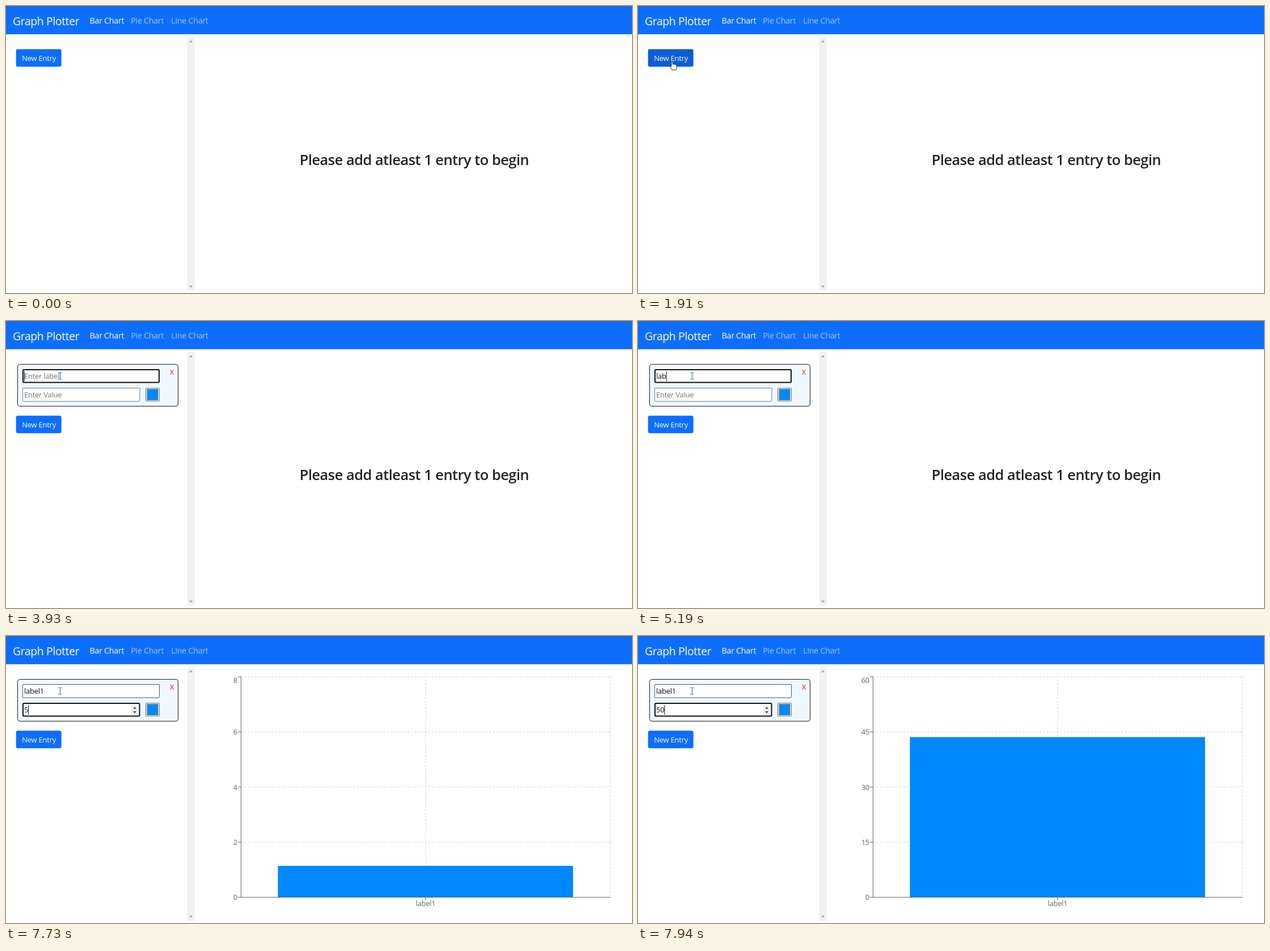
An HTML page for the animation above (8 s loop, 1104 by 507 pixels).

```html
<!DOCTYPE html>
<html lang="en">
<head>
<meta charset="utf-8">
<title>Graph Plotter</title>
<style>
  html, body { margin: 0; width: 100%; height: 100%; overflow: hidden; background: #fff; }
  svg { display: block; width: 1104px; height: 507px; }
  text { font: 13px "Open Sans", "Noto Sans", sans-serif; letter-spacing: -.02em; white-space: pre; }
  .brand { font-size: 19.45px; fill: #fff; }
  .nav text { font-size: 14.3px; fill: #fff; }
  .nav .dim { fill: #9ec5fe; }
  #heading { font-size: 25.45px; font-weight: 600; fill: #212529; text-anchor: middle; }
  .field { fill: #fff; stroke: #767676; }
  .field.focus { stroke: #101010; stroke-width: 2; }
  .grid { stroke: #ccc; stroke-dasharray: 3 3; fill: none; }
  .axis { stroke: #666; fill: none; }
  #chart text { fill: #666; }
  .caret { fill: #111; }
  .hidden { display: none; }
</style>
</head>
<body>
<svg viewBox="0 0 1104 507">
  <rect width="1104" height="49" fill="#0d6efd"/>
  <rect y="49" width="1104" height="1" fill="#3f7fe0"/>
  <rect width="1104" height="1" fill="#456a9e"/>
  <text class="brand" x="12" y="33.5">Graph Plotter</text>
  <g class="nav">
    <text x="147.5" y="31">Bar Chart</text>
    <text class="dim" x="220.3" y="31">Pie Chart</text>
    <text class="dim" x="291.3" y="31">Line Chart</text>
  </g>

  <rect x="319.5" y="55" width="13.5" height="448" fill="#f1f1f1"/>
  <path d="M323 64l3.2-3.4 3.2 3.4zM323 494l3.2 3.4 3.2-3.4z" fill="#9ba1b5"/>

  <text id="heading" x="720" y="281">Please add atleast 1 entry to begin</text>

  <g id="chart">
    <path class="grid" d="M414.5 72.5H1066M414.5 169.5H1066M414.5 266.5H1066M414.5 364.5H1066M414.5 461.5H1066M740 72V461M1066 72V461M414.5 72V461"/>
    <rect id="bar" x="479.5" width="520.5" fill="#08f"/>
    <path class="axis" d="M414.5 72V461.5H1066M740 461.5v5.5"/>
    <g id="ticks"></g>
    <text x="740" y="477" text-anchor="middle">label1</text>
  </g>

  <g id="card">
    <rect x="20.5" y="76.5" width="283" height="74" rx="4" fill="#f0f8ff" stroke="#16191c"/>
    <text id="remove" x="288.7" y="94.5">X</text>
    <rect id="labelBox" rx="1.5"/>
    <text id="labelText" x="32" y="102.3"></text>
    <rect id="labelCaret" class="caret" y="89" width="1" height="17.5"/>
    <rect id="valueBox" rx="1.5"/>
    <text id="valueText" x="32" y="135.2"></text>
    <rect id="valueCaret" class="caret" y="122" width="1" height="17"/>
    <g id="spinner">
      <rect x="221" y="121.5" width="12" height="17" fill="#efefef"/>
      <path d="M224 128.5l3-3.5 3 3.5zM224 133l3 3.5 3-3.5z" fill="#444"/>
    </g>
    <rect x="246.5" y="118.5" width="24" height="23" rx="1.5" fill="#efefef" stroke="#767676"/>
    <rect x="249" y="120.5" width="19" height="19" fill="#08f" stroke="#777"/>
  </g>

  <g id="button">
    <rect id="ring" x="15" y="74" width="85.5" height="36" rx="6" fill="#98c1fe"/>
    <rect id="face" x="17.7" y="76.2" width="80" height="31" rx="3.2"/>
    <text x="28.3" y="96.8" fill="#fff">New Entry</text>
  </g>

  <g id="arrow">
    <path d="M.5.5V13.2L3.4 10.5 5.4 15 7.3 14.2 5.4 9.8H9.3Z" fill="#fff" stroke="#111" stroke-width=".9"/>
  </g>
  <g id="hand">
    <path d="M-1.2 1Q0-.8 1.2 1V6Q2.6 5 3.8 6.3 5.2 5.4 6.3 6.8 7.8 6.2 8.4 8V11.5Q8 14 6.8 16H.2Q-1.5 13-4 9.8-3.6 8-1.2 10Z" fill="#fff" stroke="#111" stroke-width=".9"/>
  </g>
  <path id="ibeam" d="M-3-6H-1Q0-6 .5-5.5 1-6 2-6H3.5M.5-5.5V5.5M-3 6H-1Q0 6 .5 5.5 1 6 2 6H3.5" fill="none"/>
</svg>
<script>
const LOOP = 8000;
const el = {};
document.querySelectorAll('[id]').forEach(node => el[node.id] = node);

const clamp = v => Math.max(0, Math.min(1, v));
const show = (node, on) => node.classList.toggle('hidden', !on);
const attrs = (node, values) => {
  for (const name in values) node.setAttribute(name, values[name]);
};
// Latest entry of a [time, value] list
const at = (list, t) => list.reduce((found, [time, value]) => t >= time ? value : found, list[0][1]);

const svgNode = (name, parent) =>
  parent.appendChild(document.createElementNS('http://www.w3.org/2000/svg', name));
const tickLabels = [0, 1, 2, 3, 4].map(i => {
  const y = 461.5 - i * 97.35;
  attrs(svgNode('path', el.ticks), { class: 'axis', d: `M409 ${y}h5.5` });
  const label = svgNode('text', el.ticks);
  attrs(label, { x: 408, y: i === 4 ? 83 : y + 4.7, 'text-anchor': 'end' });
  return label;
});

const moves = [
  { start: 70, end: 340, steps: 4, from: [1093.7, 549.3], to: [519, 340] },
  { start: 740, end: 950, steps: 4, from: [519, 340], to: [57, 160] },
  { start: 1220, end: 1830, steps: 9, from: [56.5, 160], to: [60, 97] },
  { start: 2440, end: 2590, steps: 3, from: [60, 97], to: [95, 97] }
];
const labelTyping = [[0, ''], [4990, 'l'], [5120, 'la'], [5190, 'lab'], [5520, 'labe'], [5720, 'label'], [6250, 'label1']];
const valueTyping = [[0, ''], [7660, '5'], [7870, '50']];
const labelBlink = [[0, false], [2860, true], [3400, false], [3930, true], [4460, false], [4990, true], [6780, false]];
const valueBlink = [[0, false], [6850, true], [7380, false], [7660, true]];
const ringFade = [[0, 0], [2050, .6], [2110, 1], [2860, .75], [2930, .35], [3000, 0]];

// CSS "ease" curve, solved by bisection
function ease(x) {
  let low = 0, high = 1;
  for (let i = 0; i < 20; i++) {
    const s = (low + high) / 2, r = 1 - s;
    if (.75 * r * s + s ** 3 < x) low = s; else high = s;
  }
  return .3 * (1 - low) ** 2 * low + 3 * (1 - low) * low ** 2 + low ** 3;
}

function cursorAt(t) {
  const move = moves.filter(m => t >= m.start).pop() || moves[0];
  const gap = (move.end - move.start) / (move.steps - 1);
  const step = t < move.start ? 0 : Math.min(move.steps, Math.floor((t - move.start) / gap + 1.001));
  return move.from.map((v, i) => v + (move.to[i] - v) * step / move.steps);
}

function drawCursor(t) {
  const [x, y] = cursorAt(t);
  const kind = t >= 2180 ? 'ibeam' : t >= 1220 && y < 107 ? 'hand' : 'arrow';
  for (const name of ['arrow', 'hand', 'ibeam']) show(el[name], name === kind);
  attrs(el[kind], { transform: `translate(${x} ${y})` });
  attrs(el.ibeam, { stroke: t < 2860 ? '#222' : '#2b62a8' });
}

function drawButton(t) {
  const hover = clamp((t - 1754) / 150) * (1 - clamp((t - 2790) / 210));
  const mix = (a, b) => Math.round(a + (b - a) * hover);
  attrs(el.button, { transform: `translate(0 ${t < 2110 ? 0 : 91})` });
  attrs(el.face, { fill: `rgb(${mix(13, 11)},${mix(110, 94)},${mix(253, 215)})` });
  attrs(el.ring, { opacity: at(ringFade, t) });
}

function drawField(name, y, width, typed, hint, focus, caretOn) {
  const inset = focus ? 1 : .5;
  const box = el[name + 'Box'], text = el[name + 'Text'], caret = el[name + 'Caret'];
  attrs(box, {
    class: focus ? 'field focus' : 'field',
    x: 29 + inset, y: y + inset, width: width - 2 * inset, height: 24.5 - 2 * inset
  });
  text.textContent = typed || hint;
  attrs(text, { fill: typed ? '#111' : '#757575' });
  show(caret, caretOn);
  attrs(caret, { x: 32 + (typed ? text.getComputedTextLength() : 0) });
}

function drawCard(t) {
  const labelFocus = t >= 2860 && t < 6850;
  show(el.card, t >= 2110);
  drawField('label', 85, 242, at(labelTyping, t), 'Enter label', labelFocus, at(labelBlink, t));
  drawField('value', 118, 207.5, at(valueTyping, t), 'Enter Value', t >= 6850, at(valueBlink, t));
  el.labelBox.style.stroke = labelFocus ? '' : '#555';
  show(el.spinner, t >= 6850);
  attrs(el.remove, { fill: t < 7660 ? '#b5301c' : '#e01c0c' });
}

function drawChart(t) {
  const visible = t >= 7660;
  show(el.chart, visible);
  show(el.heading, !visible);
  if (!visible) return;
  const tick = 7660 + Math.floor((t - 7660) / 70) * 70;
  const grown = start => ease(clamp((tick - start) / 400));
  const second = t >= 7870;
  const height = second ? 243.3 + 81.1 * grown(7825) : 243.3 * grown(7662);
  attrs(el.bar, { y: 461.5 - height, height });
  tickLabels.forEach((label, i) => label.textContent = i * (second ? 15 : 2));
}

const origin = performance.now();
function render() {
  const t = (performance.now() - origin) % LOOP;
  drawCursor(t);
  drawButton(t);
  drawCard(t);
  drawChart(t);
  requestAnimationFrame(render);
}
render();
</script>
</body>
</html>
```
